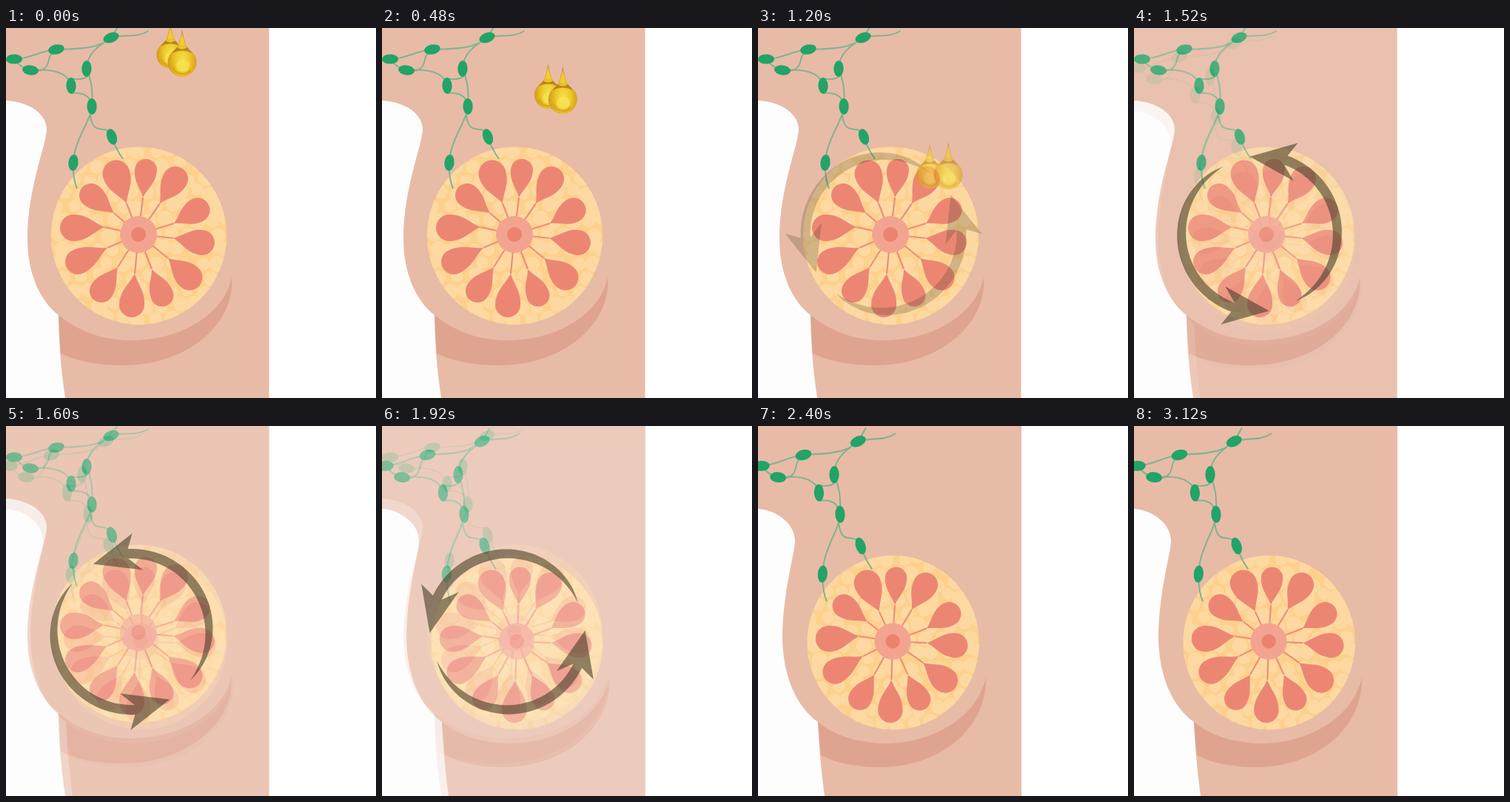
Recreate the animation shown at these times as an HTML page. Size 500 px wide and 500 px high, loop 3200 ms.

```html
<!DOCTYPE html>
<html lang="en">
<head>
<meta charset="utf-8">
<title>Massage illustration</title>
<style>
  html, body { margin: 0; width: 100%; height: 100%; overflow: hidden; background: #fff; }
  svg { display: block; width: 100vw; height: 100vh; }
</style>
</head>
<body>
<svg id="stage" viewBox="0 0 500 500" preserveAspectRatio="xMinYMin meet">
  <defs>
    <clipPath id="disc"><ellipse cx=".5" cy="1.7" rx="118.5" ry="120"/></clipPath>
    <radialGradient id="gold" cx=".52" cy=".66" r=".62">
      <stop offset="0" stop-color="#f7e24c"/>
      <stop offset=".4" stop-color="#edc92b"/>
      <stop offset=".72" stop-color="#dba51d"/>
      <stop offset="1" stop-color="#c08a1c"/>
    </radialGradient>
    <g id="drop">
      <path d="M0 -45 C2 -33 5 -23 9 -18 A19.5 19.5 0 1 1 -9 -18 C-5 -23 -2 -33 0 -45Z" fill="url(#gold)"/>
      <path d="M-7 -21 Q0 -16 7 -21 L14 -13 Q0 -20 -14 -13Z" fill="#a96f16" opacity=".75"/>
      <path d="M0 -40 L4 -24 Q0 -21 -4 -24Z" fill="#f0cb35"/>
      <path d="M-13 5 A14 14 0 0 0 11 10" fill="none" stroke="#cf9818" stroke-width="2" opacity=".7"/>
      <ellipse cx="1" cy="4" rx="9" ry="8" fill="#f8e75c" opacity=".65"/>
    </g>
  </defs>
</svg>
<script>
const NS = 'http://www.w3.org/2000/svg';
const stage = document.getElementById('stage');

function add(parent, tag, attrs = {}) {
  const el = document.createElementNS(NS, tag);
  for (const key in attrs) el.setAttribute(key, attrs[key]);
  parent.append(el);
  return el;
}

function seeded(seed) {
  return () => (seed = (seed * 16807) % 2147483647) / 2147483647;
}

// Lobes: tip x, y, bulb x, y, bulb radius
const lobes = [
  [163, 237, 149, 197, 18.5], [185, 229, 189, 192, 15], [208, 237, 229, 204, 17],
  [227, 264, 259, 246, 16.5], [226, 284, 265, 290, 17], [219, 311, 248, 337, 17.5],
  [197, 326, 211, 361, 15.5], [174, 332, 170, 374, 17], [151, 323, 129, 355, 16],
  [137, 297, 97, 316, 17], [133, 269, 91, 270, 18], [146, 250, 115, 226, 16]
];

// Nodes: x, y, tilt
const nodes = [
  [142, 13, -20], [68, 29, -12], [11, 42, 0], [33, 57, 6], [109, 55, 92],
  [88, 78, 88], [116, 106, 88], [143, 147, 72], [91, 182, 96]
];

const vessels = `M-8 44 L11 42 C35 41 45 31 68 29 C100 28 126 28 142 13 L153 -4
  M142 13 C162 8 175 14 193 4 M11 42 Q20 54 33 57 C52 62 57 50 58 42 Q60 34 68 29
  M33 57 C60 55 84 58 88 78 M131 21 Q110 34 109 55 C116 72 118 88 116 106
  M88 68 Q102 72 112 64 M88 88 Q108 86 114 98
  M116 106 C116 124 92 150 91 182 Q90 203 96 217
  M114 118 C118 150 136 126 143 147 Q148 163 158 177`;

function drawLobe(parent, [tx, ty, bx, by, r]) {
  const x = tx - 179, y = ty - 279, dx = bx - tx, dy = by - ty;
  const len = Math.hypot(dx, dy);
  add(parent, 'path', { d: `M0 0L${x} ${y}`, stroke: '#ec8e7a', 'stroke-width': 2.2 });
  add(parent, 'path', {
    d: `M0 0C${len * .35} ${-r * .35} ${len * .55} ${-r} ${len} ${-r}
        A${r} ${r} 0 0 1 ${len} ${r}C${len * .55} ${r} ${len * .35} ${r * .35} 0 0Z`,
    transform: `translate(${x} ${y}) rotate(${Math.atan2(dy, dx) * 180 / Math.PI})`,
    fill: '#ec8673'
  });
}

function drawGland(parent, transform) {
  const g = add(parent, 'g', { transform });
  const fat = add(g, 'g', { 'clip-path': 'url(#disc)' });
  const rand = seeded(71);
  add(fat, 'rect', { x: -125, y: -125, width: 250, height: 250, fill: '#fdd08b' });
  for (let row = -6; row <= 6; row++) {
    for (let col = -6; col <= 6; col++) {
      add(fat, 'circle', {
        cx: (col + (row & 1) / 2) * 22 + rand() * 8 - 4,
        cy: row * 19 + rand() * 8 - 4,
        r: 8 + rand() * 3.5,
        fill: '#fdd9a1'
      });
    }
  }
  lobes.forEach(lobe => drawLobe(g, lobe));
  add(g, 'circle', { r: 25, fill: '#f2a490' });
  add(g, 'circle', { r: 10, fill: '#eb8370' });
}

function drawPose({ width, side, fold, gland, net }) {
  const g = add(stage, 'g');
  add(g, 'rect', { width, height: 500, fill: '#e8bba7' });
  add(g, 'path', { d: side, fill: '#fdfdfd' });
  add(g, 'path', { d: fold, fill: '#dfa48f' });
  drawGland(g, gland);
  const green = add(g, 'g', { transform: net });
  add(green, 'path', { d: vessels, fill: 'none', stroke: '#7fb48f', 'stroke-width': 2 });
  for (const [x, y, tilt] of nodes) {
    add(green, 'ellipse', {
      rx: 11, ry: 6.6, fill: '#22a367',
      transform: `translate(${x} ${y}) rotate(${tilt})`
    });
  }
  return g;
}

const rest = drawPose({
  width: 355.5,
  side: 'M0 98C32 100 54 116 55 136C55 158 29 215 29 285C29 330 45 368 71 388C71 420 74 460 80 500H0Z',
  fold: 'M71 388C100 412 135 422 168 422C240 422 295 385 305 337C310 400 245 456 158 456C125 456 95 450 74 440Z',
  gland: 'translate(179 279)',
  net: ''
});
const lifted = drawPose({
  width: 356,
  side: 'M0 112C28 114 50 134 50 155C50 172 33 225 33 288C34 335 50 378 81 400C82 430 86 470 90 500H0Z',
  fold: 'M81 400C105 420 140 429 175 429C245 427 298 388 308 339C310 410 245 461 165 461C130 461 105 455 85 445Z',
  gland: 'translate(182 291) rotate(-3.5) scale(.98)',
  net: 'matrix(1 -.02 .018 1.055 -7 9.8)'
});

// Tapered arc with its head at angle 0 and its tail at 159 degrees
function arrowPath() {
  const at = (r, deg) => {
    const a = deg * Math.PI / 180;
    return `${(r * Math.cos(a)).toFixed(1)} ${(r * Math.sin(a)).toFixed(1)}`;
  };
  const outer = [], inner = [];
  for (let deg = 27; deg <= 159; deg += 3) {
    const swell = 1 - ((deg - 27) / 132) ** 4;
    outer.push(at(103 + 9 * swell, deg));
    inner.unshift(at(103 - 4 * swell, deg));
  }
  return 'M' + [at(105, 0), at(133, 30), ...outer, ...inner, at(85, 40)].join('L') + 'Z';
}

const arrows = add(stage, 'g', { fill: 'rgb(72,64,42)' });
for (const turn of [0, 180]) {
  add(arrows, 'path', { d: arrowPath(), transform: `rotate(${turn})` });
}

const oil = add(stage, 'g');
const backDrop = add(oil, 'use', { href: '#drop' });
const frontDrop = add(oil, 'use', { href: '#drop' });

const STEP = 100, STEPS = 32;
const ramp = (i, from, to) => Math.min(1, Math.max(0, (i - from) / (to - from)));

function draw(ms) {
  const i = Math.round(ms / STEP) % STEPS;

  const x = 238 + i + .05 * i * i;
  const y = 47 + 8.1 * i + .381 * i * i;
  frontDrop.setAttribute('transform', `translate(${x} ${y})`);
  backDrop.setAttribute('transform',
    `translate(${x - 16 - .75 * i} ${y - 10 + .83 * i}) scale(.95)`);
  oil.setAttribute('opacity', 1 - ramp(i, 10, 15));

  const turn = i <= 16 ? -119.5 - 22.4 * (i - 16) : -119.5 - 20.5 * (i - 16);
  arrows.setAttribute('transform', `translate(169.5 278) rotate(${turn})`);
  arrows.setAttribute('opacity', .6 * ramp(i, 10, 15) * (1 - ramp(i, 20, 24)));

  const mix = ramp(i, 14, 23);
  rest.setAttribute('opacity', 1 - mix);
  lifted.setAttribute('opacity', mix);
}

const start = performance.now();
function tick() {
  draw((performance.now() - start) % (STEP * STEPS));
  requestAnimationFrame(tick);
}
draw(0);
requestAnimationFrame(tick);
</script>
</body>
</html>
```
